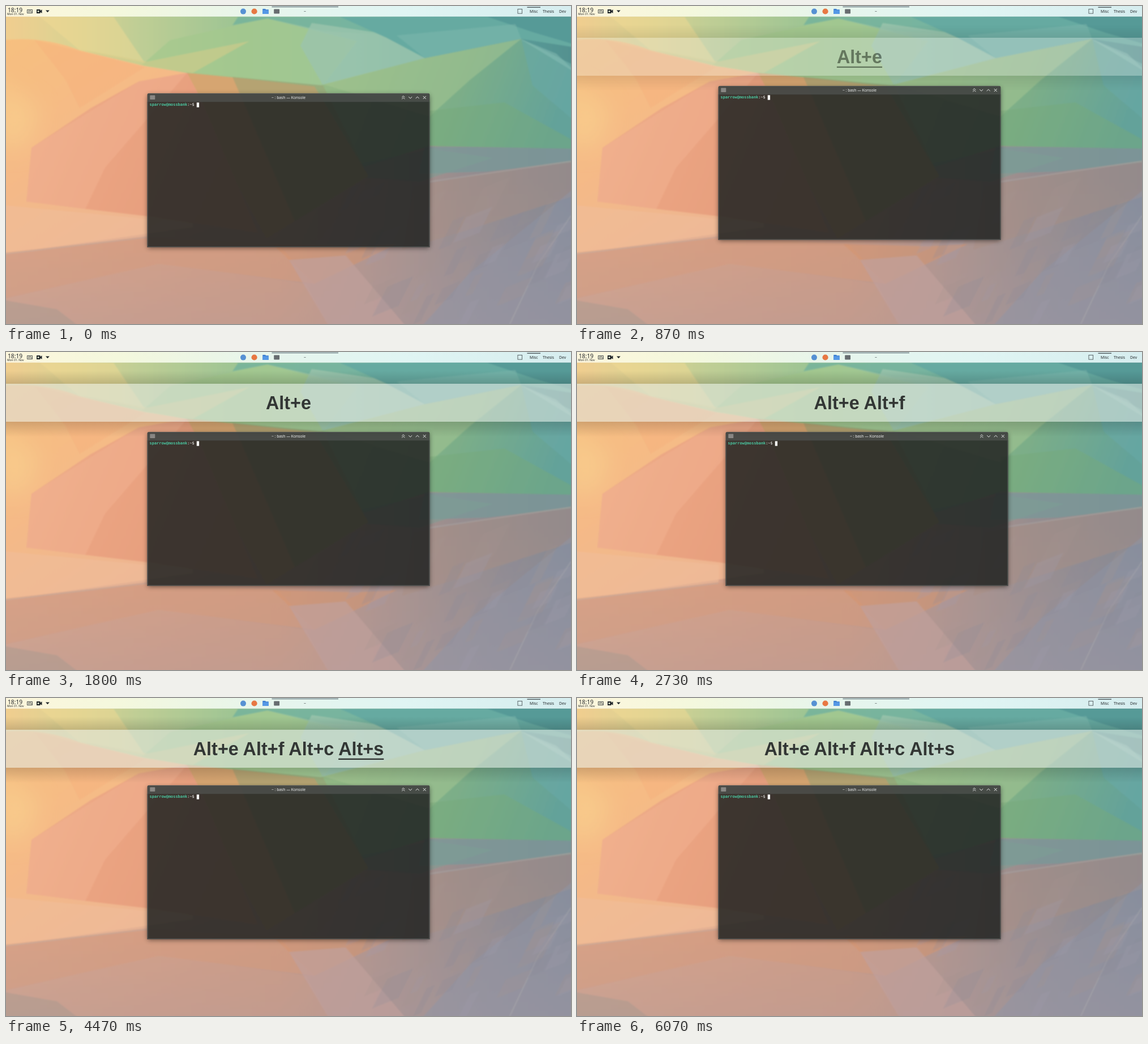
Recreate the animation shown at these times as an HTML page. Size 998 px wide and 561 px high, loop 6.14 s.

```html
<!DOCTYPE html>
<html lang="en">
<head>
<meta charset="utf-8">
<title>Moving a window with shortcuts</title>
<style>
  html, body { margin: 0; width: 100%; height: 100%; overflow: hidden; background: #c9a48c; }
  svg { display: block; width: 100%; height: 100%; }
  text { font-family: "Noto Sans", sans-serif; white-space: pre; }
  .mono { font: 6.93px "DejaVu Sans Mono", monospace; }
  .keys { font: bold 32.4px "Liberation Sans", Arial, sans-serif; }
  .panel { fill: #23282b; font-size: 6.8px; }
</style>
</head>
<body>
<svg viewBox="0 0 998 561" preserveAspectRatio="none">
  <defs>
    <linearGradient id="sky">
      <stop offset="0" stop-color="#f4cd8f"/><stop offset=".13" stop-color="#dbd292"/>
      <stop offset=".24" stop-color="#c0ce95"/><stop offset=".42" stop-color="#9cc493"/>
      <stop offset=".6" stop-color="#8fc0aa"/><stop offset=".75" stop-color="#64aaa3"/>
      <stop offset="1" stop-color="#528f8e"/>
    </linearGradient>
    <linearGradient id="ground">
      <stop offset="0" stop-color="#ebb391"/><stop offset=".25" stop-color="#e3a585"/>
      <stop offset=".48" stop-color="#d59c80"/><stop offset=".62" stop-color="#b8968a"/>
      <stop offset=".8" stop-color="#968d8f"/><stop offset="1" stop-color="#7f8793"/>
    </linearGradient>
    <linearGradient id="dusk" x2="0" y2="1">
      <stop offset=".2" stop-color="#a8979c" stop-opacity="0"/><stop offset="1" stop-color="#a8979c" stop-opacity=".62"/>
    </linearGradient>
    <linearGradient id="sand" x2=".6" y2="1">
      <stop offset="0" stop-color="#f7c07f"/><stop offset=".5" stop-color="#f5ba87"/><stop offset="1" stop-color="#edb592"/>
    </linearGradient>
    <linearGradient id="salmon" x1="0" x2="1" y2=".3">
      <stop offset="0" stop-color="#efb08b"/><stop offset=".5" stop-color="#eaa381"/><stop offset="1" stop-color="#e39c7c"/>
    </linearGradient>
    <linearGradient id="meadow" x2="1" y2=".15">
      <stop offset="0" stop-color="#aebf85"/><stop offset=".45" stop-color="#8fb886"/>
      <stop offset=".72" stop-color="#7cae88"/><stop offset="1" stop-color="#63a29a"/>
    </linearGradient>
    <linearGradient id="glass">
      <stop offset="0" stop-color="#fdf6dc"/><stop offset=".2" stop-color="#f4f8dd"/>
      <stop offset=".45" stop-color="#e7f5ec"/><stop offset=".7" stop-color="#e0f5f3"/><stop offset="1" stop-color="#d6edef"/>
    </linearGradient>
    <linearGradient id="shade" x2="0" y2="1">
      <stop offset="0" stop-opacity="0"/><stop offset="1" stop-opacity=".15"/>
    </linearGradient>
    <filter id="soft" x="-5%" y="-5%" width="110%" height="110%"><feGaussianBlur stdDeviation="1.2"/></filter>
    <filter id="haze" x="-40%" y="-40%" width="180%" height="180%"><feGaussianBlur stdDeviation="20"/></filter>
    <filter id="shadow" x="-10%" y="-10%" width="120%" height="125%"><feGaussianBlur stdDeviation="4.5"/></filter>
  </defs>

  <g id="wallpaper" filter="url(#soft)">
    <path fill="url(#sky)" d="M-20-20H1018V320H-20Z"/>
    <path fill="url(#ground)" d="M-20 235H1018V581H-20Z"/>
    <path fill="url(#dusk)" d="M-20 235H1018V581H-20Z"/>
    <!-- upper hills -->
    <path fill="#f2d993" opacity=".5" d="M60 19L190 19L245 100L130 78Z"/>
    <path fill="#a4c98e" opacity=".75" d="M290 60L460 22L620 62L560 140L320 118L240 104Z"/>
    <path fill="#d8cd8a" opacity=".55" d="M130 76L250 98L430 62L330 118L245 108Z"/>
    <path fill="#72b29d" opacity=".8" d="M410 19H610L690 52L560 44L462 22L400 34Z"/>
    <path fill="#9bc5ad" opacity=".8" d="M540 30L690 52L742 92L560 140L520 70Z"/>
    <path fill="#66aaa1" d="M590 19H1018V75L910 58L740 92L672 56Z"/>
    <path fill="#4f9292" opacity=".65" d="M850 19H1018V72L930 46Z"/>
    <path fill="#80b9ae" opacity=".45" d="M690 52L900 32L910 58L740 92Z"/>
    <path fill="url(#meadow)" d="M330 118L555 140L740 92L910 58L1018 112V252L748 247L520 320L400 260Z"/>
    <path fill="#a8c794" opacity=".5" d="M560 138L740 92L910 58L820 130L748 195Z"/>
    <path fill="#68a9a7" opacity=".6" d="M910 58L1018 112V215L930 140Z"/>
    <path fill="#8cc0b9" opacity=".45" d="M908 58L1010 120L972 84Z"/>
    <path fill="#77a879" opacity=".45" d="M748 185L880 170L998 235V252L748 247Z"/>
    <path fill="#789999" opacity=".75" d="M740 248L1018 252V274L850 292L730 296Z"/>
    <path fill="#7d9e96" opacity=".55" d="M540 296L750 252L860 268L730 310Z"/>
    <!-- warm side -->
    <path fill="url(#sand)" d="M-20 62Q60 50 130 78L245 106L320 118L330 390L-20 440Z"/>
    <path fill="#fad592" opacity=".5" filter="url(#haze)" d="M-20 130L60 180L40 250L-20 250Z"/>
    <path fill="#f3a879" opacity=".3" d="M50 60L245 108L130 180L105 130Z"/>
    <path fill="#d6a571" d="M320 118L420 128L545 142L640 300L460 410L390 280Z"/>
    <path fill="#9ba373" opacity=".55" d="M400 125L560 140L640 300L510 380Z"/>
    <path fill="url(#salmon)" d="M320 118L345 165L445 400L250 371L140 358L36 345L45 250L150 180L235 133Z"/>
    <path fill="#f2b494" opacity=".4" d="M235 133L320 118L175 285L140 358L36 345L45 250Z"/>
    <!-- lower planes -->
    <path fill="#f0bd9b" opacity=".55" d="M-20 350L250 376V406L-20 440Z"/>
    <path fill="#d69c7e" opacity=".55" d="M-20 437L250 407L480 420L545 490L270 455L-20 520Z"/>
    <path fill="#cc9e89" opacity=".4" d="M-20 516L270 455L530 490L580 581H150L90 535Z"/>
    <path fill="#b09a8c" opacity=".55" d="M-20 516L90 535L150 581H-20Z"/>
    <path fill="#d5966f" opacity=".55" d="M470 420L620 424L690 420L545 490Z"/>
    <path fill="#c1a09c" opacity=".7" d="M500 448L600 440L720 581H580Z"/>
    <path fill="#a88e83" opacity=".45" d="M720 318L860 292L1018 270V330L800 400L700 430Z"/>
    <path fill="#8d94a8" opacity=".45" d="M720 581L820 470L1018 310V581Z"/>
    <path fill="none" stroke="#b4b4b2" stroke-width="2" opacity=".35" d="M890 561L940 455L998 370M748 310L998 274M0 437L250 408"/>
    <g id="strokes"></g>
  </g>

  <!-- top panel -->
  <path fill="url(#glass)" d="M0 0H998V18.5H0Z"/>
  <path fill="#fff" opacity=".4" d="M0 17.7H998V18.6H0Z"/>
  <g class="panel">
    <text x="3" y="11" font-size="10.2">18:19</text>
    <text x="2" y="16.4" font-size="5">Mon 01. Nov</text>
    <path fill="none" stroke="#3b4245" stroke-width=".9" d="M37.5 6.5H46.5V12.5H37.5ZM39 8.4H45M39 10.4H42M43 10.5H46"/>
    <path d="M54 6H60.5V8.3L63.5 6.3V12.7L60.5 10.7V13H54Z"/>
    <circle cx="57" cy="9.5" r="1.4" fill="#edf5dc"/>
    <path d="M70 7.5H76.8L73.4 11.2Z"/>
    <circle cx="419" cy="9.6" r="5" fill="#5691d3"/>
    <circle cx="438.6" cy="9.5" r="5.1" fill="#e77843"/>
    <path fill="#3d7fd0" d="M453.3 5H458L459.2 6.2H463.8V14H453.3Z"/>
    <path fill="#5598e6" d="M453.3 7.4H463.8V14H453.3Z"/>
    <rect x="473.2" y="5.6" width="9.9" height="8" rx="1" fill="#676d70"/>
    <path fill="#75858b" d="M469.5 0.7H587V2.2H469.5Z"/>
    <text x="526" y="11.8">~</text>
    <rect x="904" y="5.5" width="7.6" height="7.6" fill="none" stroke="#50595c" stroke-width=".9"/>
    <path fill="#4f5a5e" d="M920.5 1.6H944V3H920.5Z"/>
    <text x="925" y="11.8">Misc</text>
    <text x="948" y="11.8">Thesis</text>
    <text x="977" y="11.8">Dev</text>
  </g>

  <!-- terminal -->
  <g id="terminal">
    <rect x="250" y="157" width="498" height="270" rx="3" opacity=".5" filter="url(#shadow)"/>
    <g id="behind"><use href="#wallpaper"/></g>
    <path fill="#212322" opacity=".86" d="M249.5 169H748.5V425.5H249.5Z"/>
    <path fill="#434644" opacity=".95" d="M249.5 169.3V157Q249.5 154 252.5 154H745.5Q748.5 154 748.5 157V169.3Z"/>
    <path fill="none" stroke="#505553" stroke-width="1.6" opacity=".75" d="M250.3 169V424.7H747.7V169"/>
    <path fill="none" stroke="#676b69" stroke-width=".6" d="M252 154.4H746"/>
    <rect x="254.3" y="157.6" width="9" height="7.4" rx=".8" fill="#8a8885"/>
    <text x="499" y="164" text-anchor="middle" font-size="6.75" fill="#f0f1f0">~ : bash — Konsole</text>
    <path fill="none" stroke="#eef0ef" stroke-width=".95" d="M699.2 161.2L701.8 158.6L704.4 161.2M699.2 164.2L701.8 161.6L704.4 164.2M711.2 160.2L714.2 163L717.2 160.2M723.7 163L726.7 160.2L729.7 163M736.8 159L741.8 164M741.8 159L736.8 164"/>
    <text class="mono" x="253.6" y="176.4" fill="#f1f1ef"><tspan font-weight="bold" fill="#4ac6a0">sparrow@mossbank</tspan>:~$</text>
    <rect x="336.8" y="170.3" width="4.3" height="8.4" fill="#fbfbf8"/>
  </g>

  <!-- pressed keys -->
  <g id="overlay" opacity="0">
    <path fill="url(#shade)" d="M0 33H998V56H0Z"/>
    <path fill="url(#shade)" transform="matrix(1 0 0 -1 0 150)" d="M0 0H998V27H0Z"/>
    <path fill="#dfe6e1" opacity=".58" d="M0 56H998V123H0Z"/>
    <text id="keys" class="keys" x="499" y="101" text-anchor="middle" fill="#323634"></text>
    <rect id="underline" y="106.6" height="2.4" fill="#323634"/>
  </g>
</svg>
<script>
const LOOP = 6140, STEP = 13, RECENT = 530, FADE = 130;
const presses = [
  { at: 800, key: 'e', dx: 0, dy: -STEP },
  { at: 2000, key: 'f', dx: STEP, dy: 0 },
  { at: 3200, key: 'c', dx: 0, dy: STEP },
  { at: 4470, key: 's', dx: -STEP, dy: 0 }
];
const $ = id => document.getElementById(id);
const SVG = 'http://www.w3.org/2000/svg';
const set = (node, attrs) => {
  for (const name in attrs) node.setAttribute(name, attrs[name]);
  return node;
};

// The terminal hides its own shadow with a clipped view of the wallpaper.
const clip = set(document.createElementNS(SVG, 'clipPath'), { id: 'pane' });
const pane = clip.appendChild(set(document.createElementNS(SVG, 'rect'),
  { x: 249.5, y: 154, width: 499, height: 271.5, rx: 2.5 }));
document.querySelector('defs').append(clip);
set($('behind'), { 'clip-path': 'url(#pane)' });
const view = $('behind').firstElementChild;

// Slanted brush marks over the mauve plain.
let seed = 11;
const random = () => (seed = seed * 16807 % 2147483647) / 2147483647;
const tones = ['#a19cab', '#a6928f', '#8b8b98'];
for (let i = 0; i < 36; i++) {
  const x = 610 + random() * 380, y = 315 + random() * 225;
  const w = 14 + random() * 34, h = 20 + random() * 45;
  $('strokes').append(set(document.createElementNS(SVG, 'path'), {
    d: `M${x} ${y}l${w} ${-w * .4}l${-h * .5} ${h}l${-w} ${w * .4}Z`,
    fill: tones[i % 3], opacity: .22
  }));
}

function render(t) {
  const done = presses.filter(p => t >= p.at);
  const x = done.reduce((sum, p) => sum + p.dx, 0);
  const y = done.reduce((sum, p) => sum + p.dy, 0);
  set($('terminal'), { transform: `translate(${x} ${y})` });
  set(view, { transform: `translate(${-x} ${-y})` });

  const fade = Math.min(1, Math.max(0, (t - presses[0].at) / FADE));
  set($('overlay'), { opacity: fade });
  const label = done.map(p => 'Alt+' + p.key).join(' ');
  if ($('keys').textContent !== label) $('keys').textContent = label;

  const last = done[done.length - 1];
  const recent = last && t < last.at + RECENT;
  if (recent) {
    const width = $('keys').getSubStringLength(label.length - 5, 5);
    const total = $('keys').getComputedTextLength();
    set($('underline'), { x: 499 + total / 2 - width, width });
  }
  set($('underline'), { visibility: recent ? 'visible' : 'hidden' });
}

const start = performance.now();
function tick() {
  render((performance.now() - start) % LOOP);
  requestAnimationFrame(tick);
}
render(0);
tick();
</script>
</body>
</html>
```
